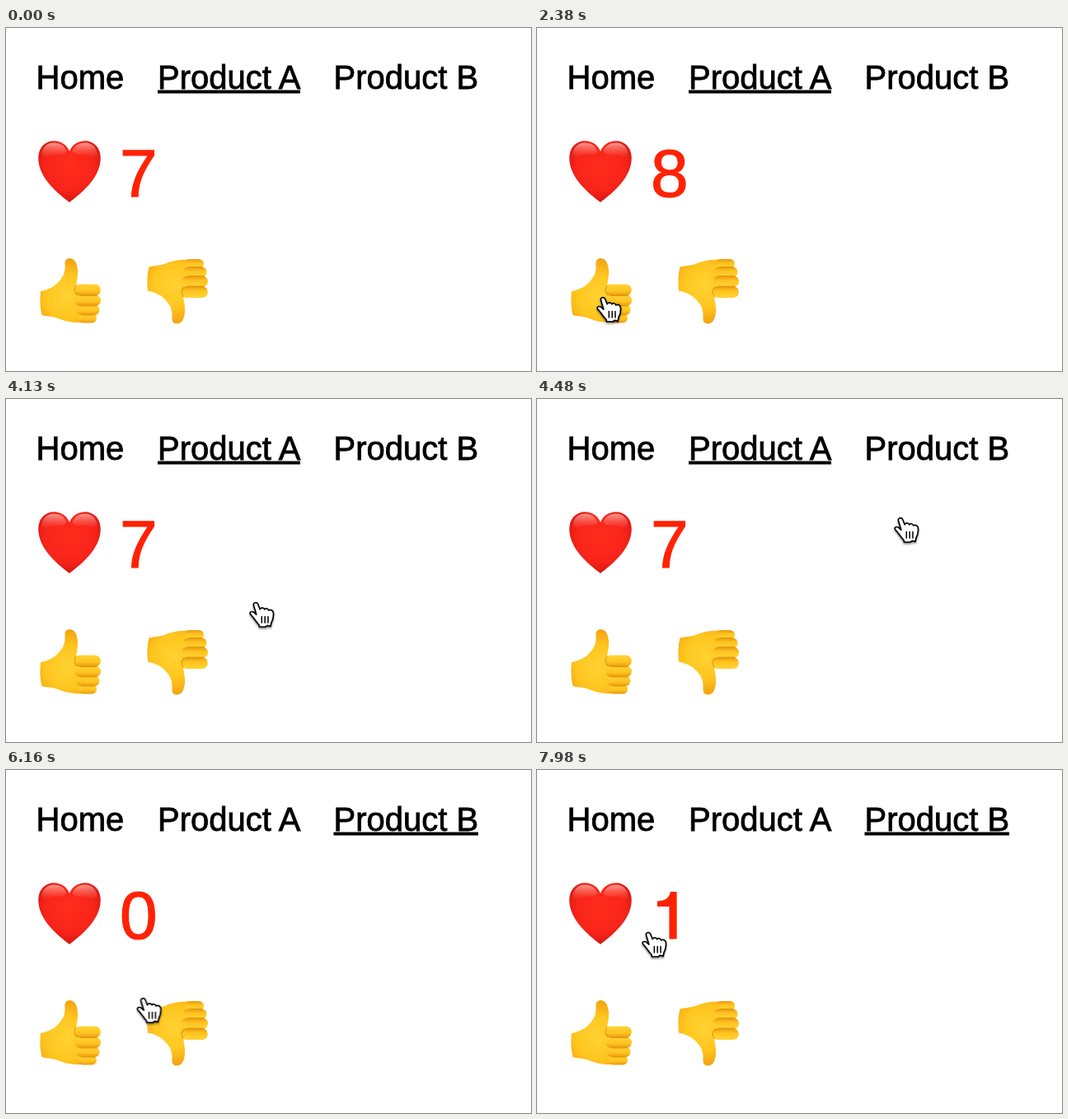
These frames come from a looping animation (637x417 px, 8 s). An HTML page:

```html
<!DOCTYPE html>
<html lang="en">
<head>
<meta charset="utf-8">
<title>Product votes</title>
<style>
html, body { margin: 0; width: 100%; height: 100%; overflow: hidden; background: #fff; }
svg { display: block; width: 637px; height: 417px; }
text { font-family: "Liberation Sans", Arial, Helvetica, sans-serif; }
.nav { font-size: 40px; fill: #000; stroke: #000; stroke-width: .8px; }
.count { font-size: 82px; fill: #ff2205; stroke: #ff2205; stroke-width: 1.2px; }

.seven, .eight, .zero, .one, .lineA, .lineB, .cursor {
  animation: 8s step-end -2ms infinite;
}
.seven { animation-name: seven; }
.eight { animation-name: eight; }
.zero { animation-name: zero; }
.one { animation-name: one; }
.lineA { animation-name: lineA; }
.lineB { animation-name: lineB; }
.cursor { animation-name: appear, move; }

@keyframes seven {
  0%, 42.875% { opacity: 1; }
  19.25%, 63.875%, 100% { opacity: 0; }
}
@keyframes eight {
  0%, 42.875%, 100% { opacity: 0; }
  19.25% { opacity: 1; }
}
@keyframes zero {
  0%, 79.625%, 100% { opacity: 0; }
  63.875% { opacity: 1; }
}
@keyframes one {
  0% { opacity: 0; }
  79.625%, 100% { opacity: 1; }
}
@keyframes lineA {
  0% { opacity: 1; }
  63.875%, 100% { opacity: 0; }
}
@keyframes lineB {
  0% { opacity: 0; }
  63.875%, 100% { opacity: 1; }
}
@keyframes appear {
  0% { opacity: 0; }
  14%, 100% { opacity: 1; }
}
/* the pointer is sampled every 70 ms */
@keyframes move {
  0%, 14% { transform: translate(82px, 372px); }
  14.875% { transform: translate(79px, 350px); }
  15.75% { transform: translate(76px, 336px); }
  16.625% { transform: translate(73px, 329px); }
  17.5% { transform: translate(72px, 326px); }
  /* over to thumbs down */
  29.75% { transform: translate(72px, 326px); animation-timing-function: steps(3); }
  32.375% { transform: translate(95px, 342px); animation-timing-function: steps(3); }
  35% { transform: translate(150px, 351px); animation-timing-function: steps(2); }
  36.75% { transform: translate(187px, 340px); animation-timing-function: steps(2); }
  38.5% { transform: translate(204px, 327px); }
  44.625% { transform: translate(235px, 295px); }
  45.5% { transform: translate(265px, 270px); }
  /* up to Product B */
  50.75% { transform: translate(265px, 270px); animation-timing-function: steps(3); }
  53.375% { transform: translate(355px, 198px); animation-timing-function: steps(3); }
  56% { transform: translate(433px, 143px); animation-timing-function: steps(3); }
  58.625% { transform: translate(455px, 99px); animation-timing-function: steps(3); }
  61.25% { transform: translate(461px, 73px); }
  62.125% { transform: translate(461px, 75px); }
  /* down to thumbs up */
  70.875% { transform: translate(461px, 75px); animation-timing-function: steps(3); }
  73.5% { transform: translate(380px, 130px); animation-timing-function: steps(3); }
  76.125% { transform: translate(190px, 255px); animation-timing-function: steps(3); }
  78.75% { transform: translate(95px, 318px); animation-timing-function: steps(2); }
  80.5% { transform: translate(82px, 324px); }
  /* to the counter */
  81.375% { transform: translate(120px, 262px); }
  82.25% { transform: translate(158px, 200px); }
  84% { transform: translate(151px, 199px); }
  84.875% { transform: translate(143px, 195px); }
  86.625% { transform: translate(142px, 193px); }
  87.5% { transform: translate(142px, 195px); }
  89.25% { transform: translate(141px, 195px); }
  92.75% { transform: translate(141px, 195px); animation-timing-function: steps(8); }
  99.75%, 100% { transform: translate(127px, 196px); }
}
</style>
</head>
<body>
<svg viewBox="0 0 637 417" xmlns="http://www.w3.org/2000/svg">
  <defs>
    <radialGradient id="red" gradientUnits="userSpaceOnUse" cx="77" cy="168" r="46">
      <stop offset="0" stop-color="#ff2d1c"/>
      <stop offset=".65" stop-color="#f8241a"/>
      <stop offset="1" stop-color="#cf1512"/>
    </radialGradient>
    <linearGradient id="gloss" x1="0" y1="0" x2="0" y2="1">
      <stop offset="0" stop-color="#ffd9cf" stop-opacity=".65"/>
      <stop offset="1" stop-color="#ff8a78" stop-opacity="0"/>
    </linearGradient>
    <radialGradient id="skin" gradientUnits="userSpaceOnUse" cx="74" cy="326" r="47">
      <stop offset="0" stop-color="#ffd233"/>
      <stop offset=".55" stop-color="#ffc61f"/>
      <stop offset="1" stop-color="#f2a010"/>
    </radialGradient>
    <linearGradient id="finger" x1="0" y1="0" x2="0" y2="1">
      <stop offset="0" stop-color="#ffd436"/>
      <stop offset=".6" stop-color="#ffc31e"/>
      <stop offset="1" stop-color="#e8980f"/>
    </linearGradient>
    <filter id="shadow" x="-30%" y="-30%" width="160%" height="170%">
      <feDropShadow dx="0" dy="1.8" stdDeviation="1.2" flood-color="#000" flood-opacity=".45"/>
    </filter>
    <g id="thumb">
      <path fill="url(#skin)" d="M42 320C52 318 60 314 66 306C70 301 72 296 71.5 288C71 283 73 280 77 280C83 280 86 285 87 294C87.5 301 86 307 85 313L97 320L100 352L95 358C84 358.5 76 357.5 67 354.5C59 350.5 52 351 43.5 349C41 340 41 330 42 320Z"/>
      <g fill="url(#finger)">
        <rect x="87" y="347" width="23" height="11.5" rx="5.7"/>
        <rect x="85" y="336.5" width="28.5" height="12.5" rx="6.2"/>
        <rect x="83" y="324.5" width="32" height="13.5" rx="6.7"/>
        <rect x="82.5" y="311.5" width="32.3" height="14" rx="6.8"/>
      </g>
      <path fill="none" stroke="#dc8d0c" stroke-width="1.1" stroke-linecap="round" stroke-opacity=".75" d="M90 325.4H110M91 338H110M92 349H108M85 313C82.500 317 82 321 86 324.500"/>
    </g>
  </defs>

  <g class="nav">
    <text x="36.5" y="74">Home</text>
    <text x="184" y="74">Product A</text>
    <text x="397.5" y="74">Product B</text>
  </g>
  <rect class="lineA" x="184" y="75.500" width="173" height="4"/>
  <rect class="lineB" x="397.500" y="75.500" width="175.500" height="4"/>

  <path fill="url(#red)" d="M77 212C67 204 39.2 184 39.2 158C39.2 145 48 137.2 58 137.2C67 137.2 74 142 77 150C80 142 87 137.2 96 137.2C106 137.2 114.8 145 114.8 158C114.8 184 87 204 77 212Z"/>
  <g fill="url(#gloss)">
    <path id="lobe" d="M43.500 157C42.500 146 49 139.500 58 139.500C66 139.500 71 143 73.500 150C69 156 63 153 56 154C50 155 47 160 43.500 157Z"/>
    <use href="#lobe" transform="translate(154) scale(-1 1)"/>
  </g>

  <g class="count">
    <text class="seven" x="138" y="205">7</text>
    <text class="eight" x="138" y="205">8</text>
    <text class="zero" x="138" y="205">0</text>
    <path class="one" role="img" aria-label="1" d="M146.5 165.5V160C155 159.5 160.5 157 162.5 148.5H169V205H161V165.5Z"/>
  </g>

  <use href="#thumb"/>
  <use href="#thumb" transform="translate(130 639.5) scale(1 -1)"/>

  <g class="cursor">
    <g filter="url(#shadow)">
      <path fill="#fff" stroke="#000" stroke-width="1.7" stroke-linejoin="round" d="M5.500 5C4.500 1.500 9.200 .3 10.700 3.500L13.200 9.700C13.800 7.200 17.800 7.200 18.700 9.800C19.800 8 23 8.400 23.800 11C25.300 9.600 29 10.400 29.400 13.700C29.900 18 29 22.500 27 26L26 30.500L22.500 29.300L20 31H12.500L12 28.500C9 25.500 7 22 4.500 19L1.500 15.500C0 12.800 3.800 11.800 5.500 13.200L8.800 16Z"/>
      <path fill="none" stroke="#000" stroke-width="1.5" stroke-linecap="round" d="M15.300 18.500V26M19.200 18.500V26M23 18.500V26"/>
    </g>
  </g>
</svg>
</body>
</html>
```
